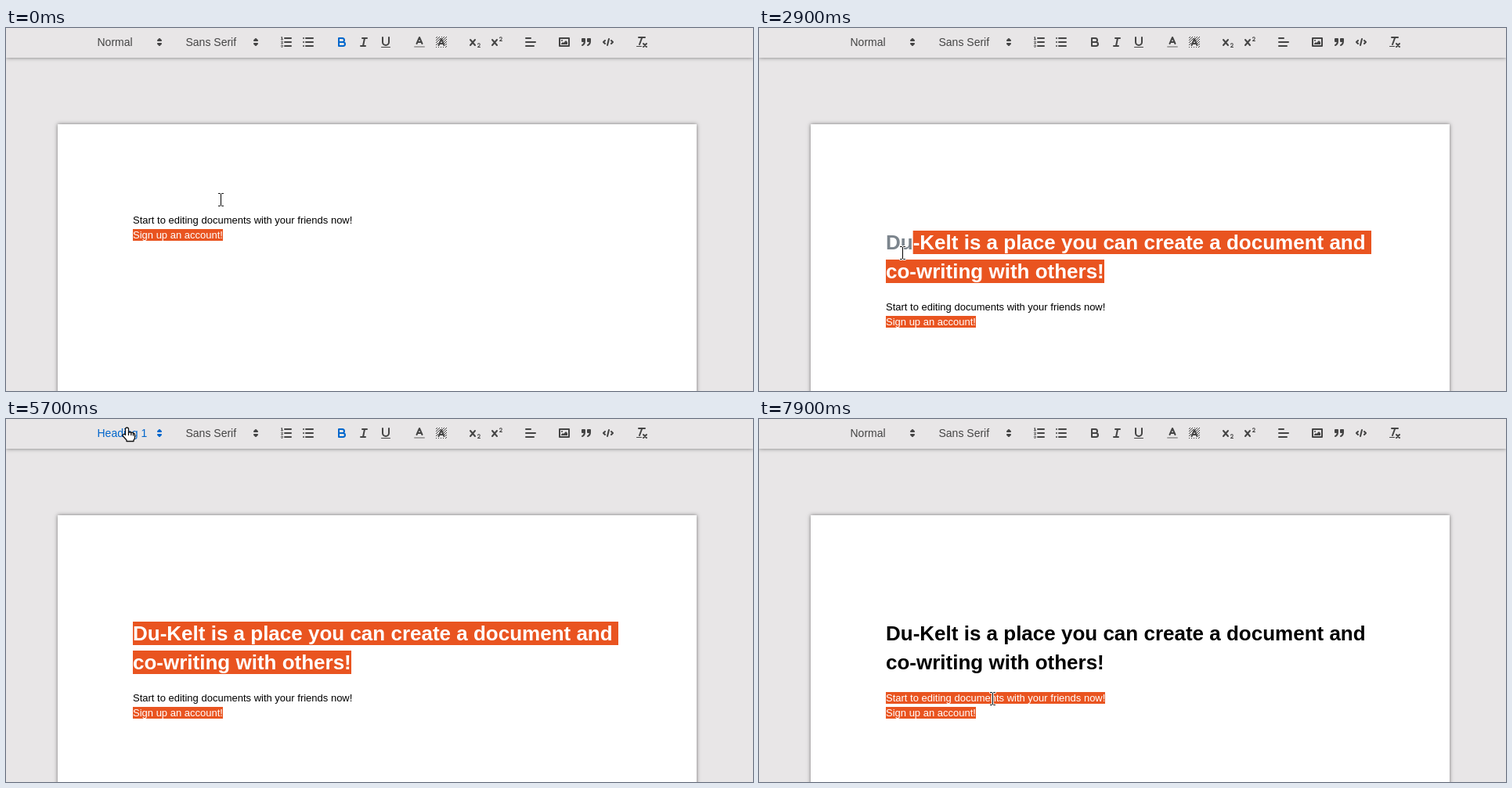
Animation, 954 px wide and 464 px high, one loop 8 s. Source, as an HTML page:

```html
<!DOCTYPE html>
<html lang="en">
<head>
<meta charset="utf-8">
<title>Document editor</title>
<style>
html, body { margin: 0; width: 100%; height: 100%; overflow: hidden; }
body { position: relative; background: #e8e6e7; font: 14px "Liberation Sans", Arial, sans-serif; color: #444; }
.page { position: absolute; left: 66px; top: 123px; width: 816px; height: 1056px; padding: 96px; box-sizing: border-box;
  background: #fff; color: #000; box-shadow: 0 0 5px rgba(0,0,0,.5); font-size: 13px; line-height: 1.42; }
.line { position: relative; white-space: pre; min-height: 1.42em; }
.heading { font-size: 26px; font-weight: bold; }
.sel { position: absolute; left: 0; top: 0; color: #fff; }
.sel span { background: #e95420; }
.bar { position: absolute; left: 0; top: 0; width: 100%; height: 38px; background: #e8e6e7; box-shadow: 0 0 5px rgba(0,0,0,.5); }
.control { position: absolute; top: 6px; height: 24px; box-sizing: border-box; border: 1px solid transparent; line-height: 22px; }
.control svg { position: absolute; right: 4px; top: 2px; }
.label { padding-left: 7.5px; }
.label svg { right: 0; }
.on { color: #06c; }
.open { color: #ccc; border-color: #ccc; }
svg { fill: none; stroke: currentColor; stroke-width: 2; stroke-linecap: round; stroke-linejoin: round; }
.thin { stroke-width: 1; }
.faint { opacity: .4; }
.fill { fill: currentColor; stroke: none; }
.both { fill: currentColor; }
.popup { position: absolute; top: 29px; box-sizing: border-box; background: #fff; border: 1px solid #ccc; box-shadow: 0 2px 8px rgba(0,0,0,.2); }
#headings { left: 108px; padding: 4px 8px 4px 7.5px; white-space: nowrap; }
#headings div { padding: 5px 0; }
#colors { left: 514px; width: 152px; height: 108px; padding: 3px 5px; }
#colors i { float: left; width: 16px; height: 16px; margin: 2px; }
#caret { position: absolute; width: 1px; height: 15px; background: #000; }
#pointer { position: absolute; left: 0; top: 0; stroke-width: 1; }
</style>
</head>
<body>
<div class="page" id="page"></div>
<div class="bar" id="bar"></div>
<div class="popup" id="headings"></div>
<div class="popup" id="colors"></div>
<div id="caret"></div>
<svg id="pointer" width="954" height="464">
  <g id="beam">
    <path stroke="#fff" stroke-width="3" d="M-3-8H-1L0-7 1-8H3M0-7V7M-3 8H-1L0 7 1 8H3"/>
    <path stroke="#000" d="M-3-8H-1L0-7 1-8H3M0-7V7M-3 8H-1L0 7 1 8H3"/>
  </g>
  <g id="hand" stroke="#111" stroke-width="1.3">
    <path fill="#fff" d="M-2 9V1.5Q-2-.5 0-.5T2 1.5V6Q4 4.5 5.5 6 7 5 8 6.8 10 6.5 10 9V12Q10 14 8.5 15.5V17H-.5V15.5L-5 10.5Q-6 8.5-4.5 8T-2 9Z"/>
    <path d="M2 6V9M5.3 6V9M8 7V9.5"/>
  </g>
  <path id="arrow" fill="#fff" stroke="#111" d="M0 0V15L3.5 12 6 17.5 8.5 16.5 6 11H10.5Z"/>
</svg>
<script>
const $ = id => document.getElementById(id);
const show = (el, visible) => { el.style.display = visible ? '' : 'none'; };
const add = (parent, html) => {
  parent.insertAdjacentHTML('beforeend', html);
  return parent.lastElementChild;
};

// Toolbar icons on an 18 x 18 grid
const path = (d, cls = '') => `<path class="${cls}" d="${d}"/>`;
const cross = path('M3 6L9 13M9 6L3 13');
const two = path('M15.5,15H13.86a3.86,3.86,0,0,0,1.91-2.97,1.8,1.8,0,0,0-1.6-1.75A1.92,1.92,0,0,0,12.02,11.7a.5,.5,0,1,0,.96,.29a.91,.91,0,0,1,1.05-.72,.81,.81,0,0,1,.74,.76c0,1.08-1.17,1.87-1.94,2.43A1.46,1.46,0,0,0,12,15.5a.5,.5,0,0,0,.5,.5h3A.5,.5,0,0,0,15.5,15Z', 'fill');
let hatch = '';
for (let y = 2; y < 16; y++) {
  for (let x = 2; x < 16; x++) {
    const underLetter = y > 2 && y < 15 && Math.abs(x - 8.5) < (y - 4) * .4375 + 1.5;
    if ((x + y) % 3 === 2 && !underLetter) hatch += `M${x} ${y}h1v1h-1z`;
  }
}
const arrows = path('M7 11L9 13 11 11ZM7 7L9 5 11 7Z');
const groups = [
  [path('M7 4H15M7 9H15M7 14H15') + path('M2.5 5.5H4.5M2.5 3L3.5 2.5V5.5M4.5 10.5h-2c0-.23,1.85-1.08,1.85-2.23A.96,.96,0,0,0,2.5,8.16M2.5,14.85a.96,.96,0,0,0,1.85-.11A.7,.7,0,0,0,3.75,14a.69,.69,0,0,0,.6-.74,.96,.96,0,0,0-1.85-.11', 'thin'),
   path('M6 4H15M6 9H15M6 14H15M3 4H3M3 9H3M3 14H3')],
  [path('M5 4H9.5a2.5 2.5 0 0 1 0 5H5ZM5 9H10.5a2.5 2.5 0 0 1 0 5H5Z'),
   path('M7 4H13M5 14H11M8 14L10 4'),
   path('M5 3V9a4 4 0 0 0 8 0V3') + path('M3.5 15H14.5a.5 .5 0 0 1 0 1H3.5a.5 .5 0 0 1 0-1', 'fill')],
  [path('M3 15H15', 'faint') + path('M5.5 11L9 3 12.5 11M11.63 9H6.38'),
   path(hatch, 'fill') + path('M5.5 13L9 5 12.5 13M11.63 11H6.38')],
  [cross + two, cross + `<g transform="translate(0 -8)">${two}</g>`],
  [path('M3 4H9M3 9H15M3 14H13')],
  [path('M3 4H15V14H3Z') + path('M5 7a1 1 0 0 1 2 0a1 1 0 0 1-2 0M5 12V11L7 9 8 10 11 7 13 9V12Z', 'fill'),
   path('M4 5h3v3h-3zM11 5h3v3h-3zM7 8c0 4-3 5-3 5M14 8c0 4-3 5-3 5', 'both'),
   path('M5 7L3 9 5 11M13 7L15 9 13 11M10 5L8 13')],
  [path('M5 3H13M6 12L9.35 3M11 11L15 15M15 11L11 15') + path('M2.5 14H8.5a.5 .5 0 0 1 0 1H2.5a.5 .5 0 0 1 0-1', 'fill')]
];

const controls = [];
function addControl(x, w, icon, text = '') {
  const el = add($('bar'), `<div class="control ${text && 'label'}" style="left:${x}px;width:${w}px"><span>${text}</span><svg width="18" height="18">${icon}</svg></div>`);
  controls.push({ el, x, w });
  return el;
}
const format = addControl(108, 98, arrows, 'Normal');
addControl(221, 108, arrows, 'Sans Serif');
let left = 344;
for (const group of groups) {
  for (const icon of group) {
    addControl(left, 28, icon);
    left += 28;
  }
  left += 15;
}
const bold = controls[4].el, color = controls[7].el;

[2, 1.5, 1.17, 1, .83, .67, 1].forEach((size, i) =>
  add($('headings'), `<div class="${i ? '' : 'on'}"><span style="font-size:${size}em">${i < 6 ? 'Heading ' + (i + 1) : 'Normal'}</span></div>`));
('000 e60000 f90 ff0 008a00 06c 93f fff facccc ffebcc ffc cce8cc cce0f5 ebd6ff bbb f06666 ffc266 ff6 66b966 66a3e0 c285ff ' +
 '888 a10000 b26b00 b2b200 006100 0047b2 6b24b2 444 5c0000 663d00 660 003700 002966 3d1466').split(' ')
  .forEach(hex => add($('colors'), `<i style="background:#${hex}"></i>`));

// Document
const title = ['Du-Kelt is a place you can create a document and ', 'co-writing with others!'];
const addLine = (text = '', cls = '') =>
  add($('page'), `<div class="line ${cls}">${text}<div class="sel"><span>${text}</span></div></div>`);
addLine();
const pasted = [addLine(), addLine(title[0], 'heading'), addLine(title[1], 'heading'), addLine()];
const lines = [pasted[1], pasted[2], addLine('Start to editing documents with your friends now!')];
addLine('Sign up an account!');

const pen = document.createElement('canvas').getContext('2d');
pen.font = 'bold 26px "Liberation Sans", Arial, sans-serif';
function snap(text, x) {
  let best = 0;
  for (let i = 1; i <= text.length; i++) {
    const edge = pen.measureText(text.slice(0, i)).width;
    if (Math.abs(edge - x) < Math.abs(best - x)) best = edge;
  }
  return best;
}

// Pointer track: time, x, y
const track = [
  [0, 274.5, 219], [500, 212.5, 228], [1200, 212.5, 228], [1300, 216.5, 229.5], [1400, 216.5, 229.5],
  [1500, 220.5, 232], [2300, 446.5, 317], [2400, 440.5, 316], [2700, 290.5, 302], [2800, 228.5, 294],
  [2900, 183.5, 287], [3000, 162.5, 277], [3200, 146.5, 261], [3300, 146.5, 261], [3700, 400.5, 110],
  [4000, 558.5, 22], [4100, 535.5, 15], [4500, 535.5, 15], [4600, 547.5, 53], [4700, 534.5, 37],
  [5200, 534.5, 37], [5700, 154.5, 11], [5900, 154.5, 11], [6200, 187.5, 55], [6400, 187.5, 55],
  [6700, 230.5, 200], [7000, 284.5, 379], [7200, 278.5, 352], [7300, 281.5, 351], [7400, 298.5, 357], [8000, 298.5, 357]
];
function pointerAt(t) {
  const i = Math.max(1, track.findIndex(key => key[0] >= t));
  const [t0, x0, y0] = track[i - 1], [t1, x1, y1] = track[i];
  const k = (t - t0) / (t1 - t0);
  return [x0 + (x1 - x0) * k, y0 + (y1 - y0) * k];
}

const ALL = [0, 999];
function selectionAt(t) {
  if (t >= 2400 && t < 4300) {
    const [x, y] = pointerAt(Math.min(t, 3200) - 30);
    return y < 292 ? [[snap(title[0], x - 162), 999], ALL] : [null, [snap(title[1], x - 162), 999]];
  }
  if (t >= 5000 && t < 7200) return [ALL, ALL];
  if (t >= 7900) return [null, null, ALL];
  if (t >= 7800) return [null, null, [87, 151]];
  return [];
}

// Caret: from, to, x, y
const carets = [[100, 500, 162, 239], [1500, 2400, 162, 331], [7300, 7600, 277, 350], [7600, 7800, 295, 350]];
const inside = (id, x, y) => {
  const r = $(id).getBoundingClientRect();
  return x >= r.left && x < r.right && y >= r.top && y < r.bottom;
};

function render(t) {
  const [x, y] = pointerAt(t);
  const choosingColor = t >= 4300 && t < 5000, choosingFormat = t >= 5800 && t < 7300;
  const inHeading = t >= 3400 && t < 7300, focused = inHeading && !choosingColor;

  pasted.forEach(line => show(line, t >= 1500));
  lines[0].style.color = lines[1].style.color = t < 5000 ? '#7c858d' : '#000';
  const ranges = selectionAt(t);
  lines.forEach((line, i) => {
    const sel = line.querySelector('.sel'), range = ranges[i];
    show(sel, range);
    if (range) sel.style.clipPath = `inset(0 calc(100% - ${range[1]}px) 0 ${range[0]}px)`;
  });

  show($('headings'), choosingFormat);
  show($('colors'), choosingColor);
  format.firstChild.textContent = inHeading ? 'Heading 1' : 'Normal';
  let hovering = inside('headings', x, y) || inside('colors', x, y);
  for (const { el, x: start, w } of controls) {
    const hover = y >= 6 && y < 30 && x >= start && x < start + w;
    hovering = hovering || hover;
    el.classList.toggle('on', hover || el === format && focused || el === bold && (focused || t < 1500));
  }
  format.classList.toggle('open', choosingFormat);
  color.classList.toggle('open', choosingColor);

  const caret = carets.find(c => t >= c[0] && t < c[1]);
  show($('caret'), caret);
  if (caret) $('caret').style.cssText = `left:${caret[2]}px;top:${caret[3]}px`;

  const kind = hovering ? 'hand' : y >= 123 && x >= 66 && x < 882 ? 'beam' : 'arrow';
  for (const id of ['beam', 'hand', 'arrow']) show($(id), id === kind);
  $(kind).setAttribute('transform', `translate(${Math.floor(x) + .5} ${Math.floor(y) + .5})`);
}

function tick() {
  render(Math.floor(performance.now() % 8000 / 100) * 100);
  requestAnimationFrame(tick);
}
tick();
</script>
</body>
</html>
```
